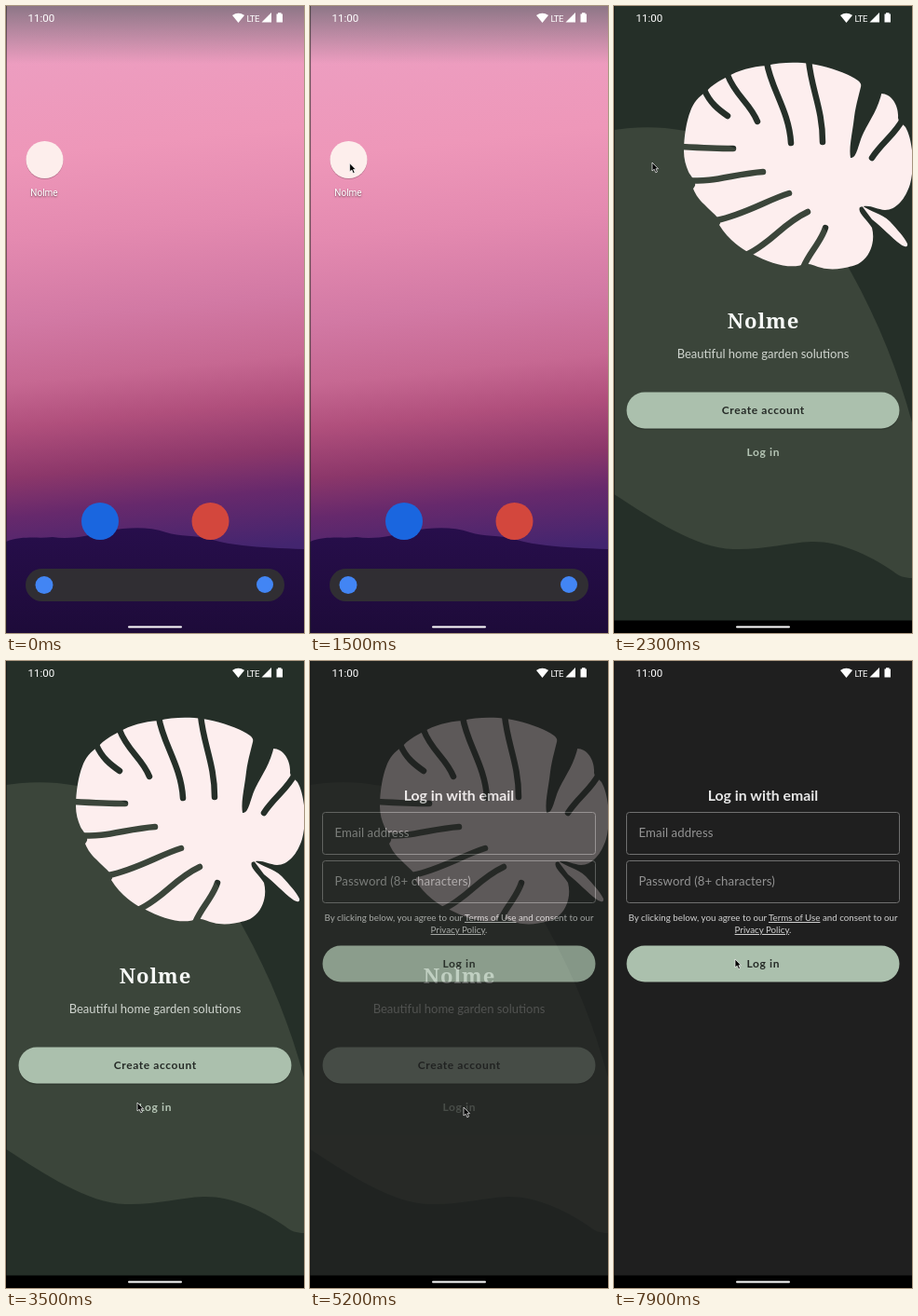
These frames come from a looping animation (320 by 673 pixels, 8 s). An HTML page:

```html
<!DOCTYPE html>
<html lang="en">
<head>
<meta charset="utf-8">
<title>Garden app login</title>
<style>
  html, body { margin: 0; width: 100%; height: 100%; overflow: hidden; background: #1f1f1f; }
  svg { display: block; width: 100%; height: 100%; }
  text { font-family: Lato, "Open Sans", sans-serif; }
  .sys { font-family: Roboto, sans-serif; fill: #fff; }
  .brand { font: bold 22px "Noto Serif", serif; letter-spacing: .9px; fill: #f6f8f6; }
  .mid { text-anchor: middle; }
  .btn { font-size: 12px; font-weight: bold; letter-spacing: .6px; fill: #262b27; }
  .hint { font-size: 13.2px; letter-spacing: .1px; fill: #939393; }
  .legal { font-size: 9.75px; fill: #d2d2d2; }
  .field { fill: none; stroke: #707070; }
  .link { text-decoration: underline; }
</style>
</head>
<body>
<svg viewBox="0 0 320 673">
  <defs>
    <linearGradient id="sky" gradientUnits="userSpaceOnUse" x1="125" y1="0" x2="185" y2="590">
      <stop offset="0" stop-color="#eca0c3"/>
      <stop offset=".25" stop-color="#ee97b9"/>
      <stop offset=".4" stop-color="#e48ab0"/>
      <stop offset=".55" stop-color="#d279a4"/>
      <stop offset=".66" stop-color="#c66892"/>
      <stop offset=".74" stop-color="#b04f7c"/>
      <stop offset=".83" stop-color="#8c376a"/>
      <stop offset=".9" stop-color="#67296c"/>
      <stop offset="1" stop-color="#43256f"/>
    </linearGradient>
    <linearGradient id="scrim" x2="0" y2="1">
      <stop offset="0" stop-color="#5a6066" stop-opacity=".65"/>
      <stop offset="1" stop-color="#5a6066" stop-opacity="0"/>
    </linearGradient>
    <linearGradient id="ground" x2="0" y2="1">
      <stop offset="0" stop-color="#270e4b"/>
      <stop offset="1" stop-color="#1b0a35"/>
    </linearGradient>
    <radialGradient id="glow">
      <stop offset=".5" stop-color="#b8c8bc" stop-opacity=".3"/>
      <stop offset="1" stop-color="#b8c8bc" stop-opacity="0"/>
    </radialGradient>
    <clipPath id="frame"><rect id="pane"/></clipPath>
    <mask id="slots" maskUnits="userSpaceOnUse" x="60" y="50" width="270" height="240">
      <rect x="60" y="50" width="270" height="240" fill="#fff"/>
      <path fill="none" stroke="#000" stroke-width="6.500" stroke-linecap="round" d="M97 90C103 104 112 111 122 118
        M122 74C130 96 146 104 154 124
        M164 60C168 88 188 112 190 147
        M209 58C212 90 224 110 224 146
        M311 120C302 138 288 146 277 163
        M72 151C90 152 108 153 128 153
        M80 187C105 190 130 180 160 178
        M110 230C140 224 165 208 188 201
        M142 267C170 254 180 234 208 221
        M203 281C210 264 222 254 227 238"/>
      <path d="M266 82C264 93 260 104 258 119C256 137 252 151 254 163C261 164 262 148 268 136C275 122 284 110 288 91Z"/>
    </mask>
  </defs>

  <g id="wall">
    <rect x="-20" y="-20" width="360" height="720" fill="url(#sky)"/>
    <path d="M-20 579L0 575C18 568 34 572 50 570C68 573 88 569 110 563C130 560 152 558 172 565C186 570 204 567 222 573C246 580 280 582 320 583H340V700H-20Z" fill="url(#ground)"/>
  </g>
  <g id="home">
    <rect width="320" height="62" fill="url(#scrim)"/>
    <circle cx="41.500" cy="166" r="20" opacity=".2"/>
    <circle cx="41.500" cy="165" r="20" fill="#fdeeec"/>
    <text class="sys mid" x="41" y="204" font-size="10" style="text-shadow:0 1px 2px #0008">Nolme</text>
    <circle cx="101" cy="553" r="20" fill="#1a66df"/>
    <circle cx="219.500" cy="553" r="20" fill="#d3473d"/>
    <rect x="21" y="604" width="278" height="35" rx="17.500" fill="#302e33"/>
    <circle cx="41" cy="621.500" r="9.500" fill="#4285f4"/>
    <circle cx="278" cy="621" r="9" fill="#4285f4"/>
  </g>
  <rect width="1" height="673" fill="#222" opacity=".55"/>

  <g id="app" clip-path="url(#frame)">
    <g id="welcome">
      <rect width="320" height="673" fill="#252f28"/>
      <path d="M0 133C30 128 75 128 115 146C175 172 225 228 253 283C285 340 306 395 320 447V614C312 614 306 612 300 607C278 592 244 574 212 575C186 576 160 584 128 583C88 582 42 551 0 524Z" fill="#3b453a"/>
      <g fill="#fdeeee">
        <path mask="url(#slots)" d="M75 156C75 140 78 123 82 113C85 104 91 97 99 92C105 85 113 80 122 76C133 69 148 65 164 64C178 60 198 60 211 62C229 65 249 71 262 80C268 84 265 92 268 97C273 101 281 97 287 94C298 94 306 107 305 120C306 126 310 126 313 130C321 144 323 172 318 191C313 207 303 219 291 219C281 218 274 212 264 216C261 222 272 229 277 238C281 253 275 270 262 277C249 282 234 284 223 281C217 280 211 276 205 277C190 283 169 277 148 266C134 260 121 248 113 235C118 230 105 222 97 213C90 207 86 199 85 196C91 190 83 184 80 178C77 171 75 164 75 156Z"/>
        <path d="M265 213C276 222 287 222 296 231C305 241 311 247 315 255C316 259 312 259 308 256C297 248 289 238 277 229Z"/>
      </g>
      <text class="brand mid" x="160.500" y="346">Nolme</text>
      <text class="mid" x="160" y="377.500" font-size="13" fill="#d0d5cf">Beautiful home garden solutions</text>
      <rect x="13.500" y="416" width="293" height="39" rx="19.500" opacity=".18"/>
      <rect x="13.500" y="414.500" width="293" height="39" rx="19.500" fill="#abc0ad"/>
      <text class="btn mid" x="160.300" y="438">Create account</text>
      <text class="btn mid" x="160.300" y="483" style="fill:#b4c4b4">Log in</text>
    </g>
    <g id="login">
      <rect width="320" height="673" fill="#1f1f1f"/>
      <text class="mid" x="160" y="149.500" font-size="15.800" font-weight="bold" fill="#e8e8e8">Log in with email</text>
      <rect class="field" x="13.500" y="162.500" width="293" height="45" rx="3"/>
      <rect class="field" x="13.500" y="214.500" width="293" height="45" rx="3"/>
      <text class="hint" x="26.500" y="189">Email address</text>
      <text class="hint" x="26.500" y="241">Password (8+ characters)</text>
      <text class="legal mid" x="160" y="279">By clicking below, you agree to our <tspan class="link">Terms of Use</tspan> and consent to our</text>
      <text class="legal mid" x="160" y="292"><tspan class="link">Privacy Policy</tspan>.</text>
      <rect x="13.500" y="305.500" width="293" height="39" rx="19.500" fill="#abc0ad"/>
      <text class="btn mid" x="160.300" y="329">Log in</text>
    </g>
    <rect width="1" height="673" fill="#111" opacity=".6"/>
  </g>
  <rect id="nav" y="659.500" width="320" height="13.500"/>
  <rect x="131" y="665.500" width="58" height="2" rx="1" fill="#fff"/>

  <g fill="#fff">
    <text class="sys" x="23.500" y="17" font-size="11.500">11:00</text>
    <path d="M243 10Q249.500 5.500 256 10L249.500 18Z"/>
    <text class="sys" x="258.500" y="16.500" font-size="9.500" letter-spacing="-.5">LTE</text>
    <path d="M274.500 17.500L285 7V17.500Z"/>
    <path d="M292 8.500V7.300H295.500V8.500H297V17.500H290.500V8.500Z"/>
  </g>
  <circle id="touch" cx="43" cy="170" r="11" fill="url(#glow)"/>
  <path id="cursor" d="M0 0V9L2.200 7.200 3.800 10.800 5.500 10 3.900 6.700H6.500Z" fill="#000" stroke="#fff" stroke-width=".7"/>
</svg>
<script>
const LOOP = 8000;
const $ = id => document.getElementById(id);
const clamp = v => Math.min(1, Math.max(0, v));
const ramp = (t, a, b) => clamp((t - a) / (b - a));
const smooth = p => p * p * (3 - 2 * p);
const easeOut = p => 1 - (1 - p) ** 3;
const linear = p => p;

// Standard curve cubic-bezier(.4, 0, .2, 1), solved by bisection.
function standard(x) {
  let lo = 0, hi = 1;
  for (let i = 0; i < 24; i++) {
    const u = (lo + hi) / 2, v = 1 - u;
    if (1.2 * v * v * u + .6 * v * u * u + u ** 3 < x) lo = u; else hi = u;
  }
  return lo * lo * (3 - 2 * lo);
}

// Each key: [time, values, easing of the stretch that ends there].
function track(t, keys) {
  const i = keys.findIndex(k => k[0] > t);
  if (i === 0) return keys[0][1];
  if (i < 0) return keys[keys.length - 1][1];
  const [t0, from] = keys[i - 1], [t1, to, ease = smooth] = keys[i];
  const p = ease(ramp(t, t0, t1));
  return from.map((v, n) => v + (to[n] - v) * p);
}

const cursorKeys = [
  [300, [70, -12]], [600, [61, 57], easeOut], [800, [60, 62]], [1350, [43, 169]],
  [1900, [41, 168]], [2800, [41, 168]], [3500, [141, 474]],
  [4500, [165, 479]], [6000, [165, 479]], [6900, [133, 318]], [7900, [130, 320]]
];
// Window as x, y, width, height, corner radius.
const paneKeys = [
  [1700, [21, 145, 40, 40, 20]],
  [1900, [.5, 49.3, 284, 571, 11], linear],
  [2200, [0, 0, 320, 673, 0], easeOut]
];

function set(el, attrs) {
  for (const k in attrs) $(el).setAttribute(k, attrs[k]);
}

function draw(t) {
  const [x, y, width, height, rx] = track(t, paneKeys);
  const s = width / 320;
  const place = `translate(${x} ${y}) scale(${s})`;
  const leave = ramp(t, 1700, 1900);
  set('pane', { x, y, width, height, rx });
  set('app', { opacity: ramp(t, 1700, 1790) });
  set('welcome', { transform: place });
  set('login', { opacity: standard(ramp(t, 4880, 5580)) });
  set('home', { opacity: 1 - .97 * leave });
  set('wall', { transform: `translate(160 336) scale(${1 - .04 * leave}) translate(-160 -336)` });
  set('nav', { opacity: ramp(t, 2050, 2200) });
  set('touch', { opacity: t >= 1700 && t < 2000 ? 1 : 0 });
  const [cx, cy] = track(t, cursorKeys);
  set('cursor', { transform: `translate(${cx} ${cy})` });
}

function tick(now) {
  draw(now % LOOP);
  requestAnimationFrame(tick);
}
draw(0);
requestAnimationFrame(tick);
</script>
</body>
</html>
```
